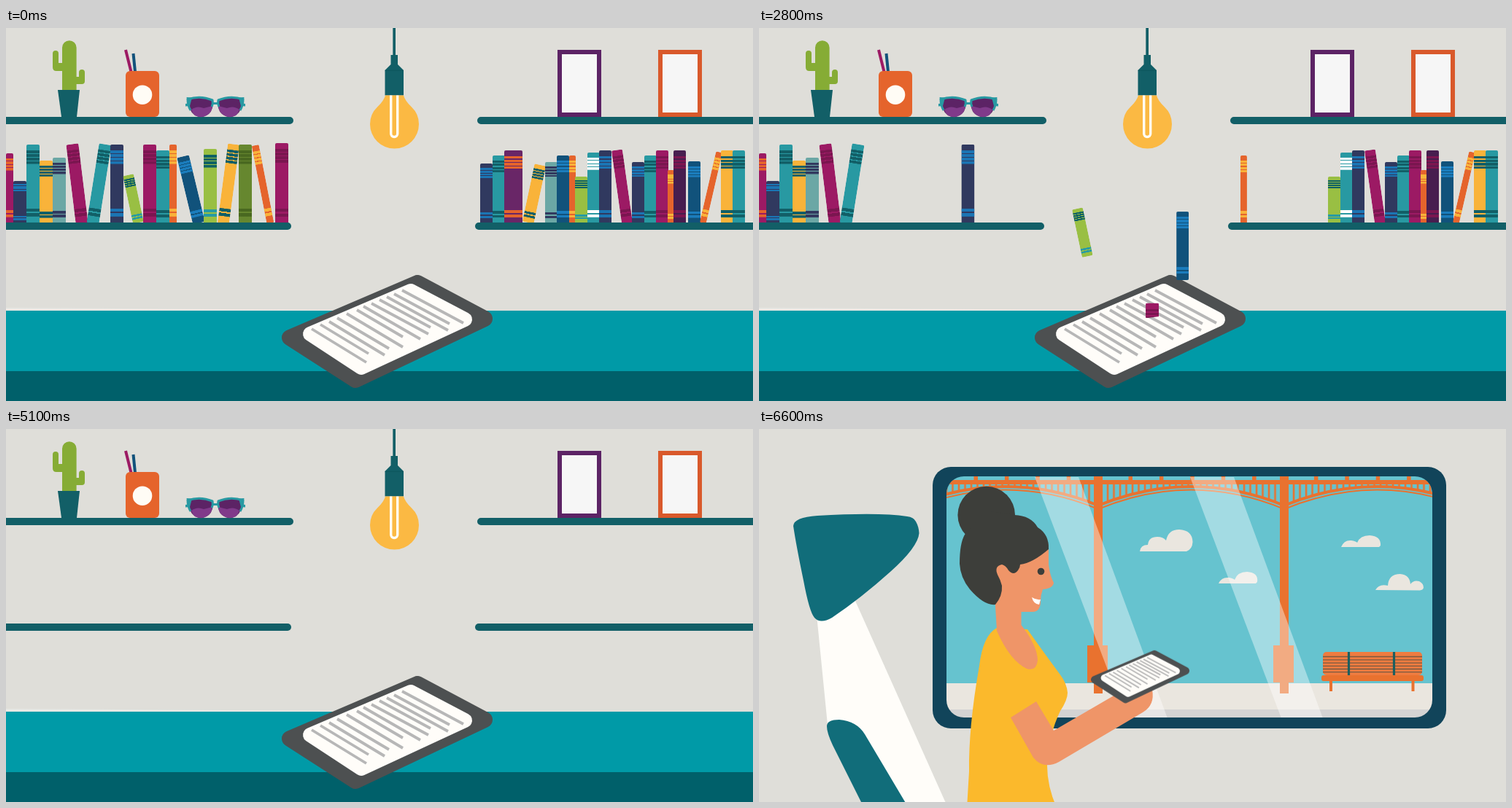
Recreate the animation shown at these times as an HTML page without scripts. Size 1024x512 px, loop 9100 ms.

```html
<!DOCTYPE html>
<html lang="en">
<head>
<meta charset="utf-8">
<title>Books into a tablet</title>
<style>
@property --t { syntax: '<number>'; inherits: true; initial-value: 0; }

html, body { margin: 0; width: 100%; height: 100%; overflow: hidden; background: #dfded9; }
.stage { position: absolute; inset: 0; overflow: hidden; contain: strict; }
svg, .books { position: absolute; left: 0; top: 0; width: 1024px; height: 512px; overflow: hidden; }

/* --t counts tenths of a second through the loop */
:root { animation: clock 9.1s steps(91) -5ms infinite; }
@keyframes clock { to { --t: 91; } }

.room, .tablet, .rider { animation: 9.1s step-end -5ms infinite; }
.room { animation-name: lift; }
.tablet { animation-name: shrink; transform-origin: 522.5px 416.5px; }
.rider { animation-name: settle; }
@keyframes lift {
  0% { transform: none; }
  61.54% { transform: translateY(-76px); }
  63.74% { transform: translateY(-156px); }
  65.93% { transform: translateY(-239px); }
  68.13% { transform: translateY(-332px); }
  70.33% { transform: translateY(-424px); }
  72.53%, 100% { transform: translateY(-520px); }
}
@keyframes shrink {
  0% { transform: none; }
  61.54% { transform: translate(-2px, -41px) scale(.93); }
  63.74% { transform: translate(-4px, -81.5px) scale(.848); }
  65.93% { transform: translate(-2px, -79px) scale(.66); }
  68.13%, 100% { transform: translate(0, -76.5px) scale(.467); }
}
@keyframes settle {
  0% { transform: translate(1px, 2px); }
  72.53%, 100% { transform: none; }
}

/* the lower shelf hides the feet of the books */
.shelf { position: absolute; top: 267px; height: 10px; background: #125f67; }
.shelf.west { left: 0; width: 391px; border-radius: 0 5px 5px 0; }
.shelf.east { left: 643px; width: 381px; border-radius: 5px 0 0 5px; }

/* each book slides to the shelf edge --e, then drops into the screen */
.books {
  clip-path: polygon(0 0, 1024px 0, 1024px 388px, 575px 388px, 565px 391px, 548px 396px,
    533px 398px, 512px 396px, 494px 394px, 0 380px);
}
.left { --e: 385; --dir: 1; --w: 18; --k: 2.15; --v: 74; }
.right { --e: 652; --dir: -1; --w: 17; --k: 2; --v: 64; }
.books i {
  --n: max(0, var(--t) - var(--s));
  --u: clamp(0, var(--t) - var(--s) - var(--k), 4);
  --h: calc(268.5px - var(--y) * 1px);
  --p: calc(var(--h) / 21);
  position: absolute;
  left: calc(var(--x) * 1px);
  top: calc(var(--y) * 1px);
  width: calc(var(--w) * 1px);
  height: var(--h);
  border-radius: 2px;
  background:
    repeating-linear-gradient(var(--b) 0 calc(var(--p) * .72), transparent 0 calc(var(--p) * .96))
      0 calc(var(--p) * 1.6) / 100% calc(var(--p) * 3.6) no-repeat,
    repeating-linear-gradient(var(--l, var(--b)) 0 calc(var(--p) * .85), transparent 0 calc(var(--p) * 1.25))
      0 calc(100% - var(--p) * 1.85) / 100% calc(var(--p) * 2.1) no-repeat,
    var(--c);
  transform:
    translate(
      calc(1px * ((var(--e) - var(--x) - var(--w) / 2) * min(var(--n) / var(--k), 1)
        + var(--dir) * var(--u) * (var(--v) - 7 * var(--u)))),
      calc(1px * var(--u) * (45 + 11 * var(--u))))
    rotate(var(--r, 0deg));
}
.magenta { --c: #9c1a64; --b: #7b1650; }
.wine { --c: #9c1a64; --b: #e5642c; }
.navy { --c: #30395f; --b: #1b75b4; }
.teal { --c: #2899a2; --b: #125f67; }
.aqua { --c: #2899a2; --b: #fff; }
.yellow { --c: #f9b33a; --b: #125f67; }
.sage { --c: #6ba7a5; --b: #32395f; }
.green { --c: #99bf43; --b: #0f6164; --l: #289ba3; }
.olive { --c: #66872f; --b: #496820; }
.blue { --c: #11527b; --b: #1b7dbd; }
.orange { --c: #e5642c; --b: #f9b33a; }
.purple { --c: #692667; --b: #e5642c; }
.plum { --c: #471e4f; --b: #7b1650; }
</style>
</head>
<body>
<div class="stage">
<svg viewBox="0 0 1024 512">
  <defs>
    <clipPath id="pane"><rect x="257" y="65" width="666" height="331" rx="24"/></clipPath>
    <pattern id="bars" width="8.5" height="40" patternUnits="userSpaceOnUse">
      <path d="M2 0V40" stroke="#e9722f" stroke-width="2.6"/>
    </pattern>
    <g id="span">
      <path d="M465 75H720V106Q592.5 53 465 106Z" fill="url(#bars)"/>
      <g fill="none" stroke="#e9722f">
        <path d="M465 105Q592.5 53 720 105" stroke-width="4"/>
        <path d="M465 110Q592.5 57 720 110" stroke-width="2"/>
      </g>
    </g>
    <g id="pillar" fill="#e9722f"><path d="M459 65h12V363h-12z"/><path d="M450 297h28v51h-28z"/></g>
    <path id="glare" d="M378 66H438L560 397H503Z" fill="#fff" opacity=".4"/>
    <path id="rim" d="M249 97Q266 92 283 99Q285 112 278 118Q269 125 259 120Q250 114 249 97Z"/>
  </defs>

  <!-- train -->
  <rect width="1024" height="512" fill="#dfded9"/>
  <rect x="238" y="52" width="704" height="359" rx="25" fill="#11445a"/>
  <g clip-path="url(#pane)">
    <path d="M257 65H923V349H257z" fill="#66c3cf"/>
    <path d="M257 349H923V385H257z" fill="#eae6df"/>
    <path d="M257 385H923V396H257z" fill="#d3d3d3"/>
    <g fill="#eae6df">
      <path d="M522 168Q523 159 533 159Q534 148 546 148Q554 148 558 153Q561 138 576 138Q594 139 594.500 155Q594 165 586 168Z"/>
      <path d="M630 212Q634 203 644 204Q650 205 652 207Q656 196 669 196Q685 197 683 210L681 212Z"/>
      <path d="M798 162Q802 152 812 153Q818 154 820 156Q824 146 837 146Q853 147 852 160L850 162Z"/>
      <path d="M845 221Q850 212 862 215Q863 199 879 199Q892 200 893 213Q897 207 905 209Q911 212 911 218Q910 221 906 221.500Z"/>
    </g>
    <use href="#span" x="-255"/><use href="#span"/><use href="#span" x="255"/>
    <path d="M257 73H923" stroke="#e9722f" stroke-width="6"/>
    <path d="M294.500 67.500H923" stroke="#e9722f" stroke-width="5" stroke-dasharray="5.500 36.900"/>
    <use href="#pillar"/><use href="#pillar" x="255"/>
    <rect x="773" y="306" width="136" height="32" rx="5" fill="#ee7c40"/>
    <path d="M773 312.500h136m-136 4.300h136m-136 4.300h136m-136 4.200h136m-136 4.200h136m-136 4.200h136" stroke="#7a5a41" stroke-width="1.300"/>
    <path d="M808.500 306v32M870.500 306v32" stroke="#1d5f60" stroke-width="3.200"/>
    <path d="M784 345v15M896.500 345v15" stroke="#e9722f" stroke-width="4"/>
    <rect x="771" y="338" width="140" height="8" rx="3" fill="#e9722f"/>
    <use href="#glare"/><use href="#glare" x="213"/>
  </g>
  <g class="rider">
    <path d="M79 255L132 236L259 520H160L94 406Z" fill="#fffdf9"/>
    <g fill="#116d7a">
      <path d="M47 133Q48 121 80 119Q165 114 203 120Q212 121 215 127Q219 134 219.500 143Q218 162 180 196Q140 232 100 259Q84 268 76 259Q69 251 61 208Q51 160 47 133Z"/>
      <path d="M93 408Q93 399 110 399Q134 401 145 419L205 520H144L101 434Q93 417 93 408Z"/>
    </g>
    <path d="M326 273Q307 283 302 325Q287 410 288 470L285 520H408Q395 490 395 462Q397 420 413 387Q423 372 423 362Q422 349 412 336Q384 298 368 275Z" fill="#fbb92c"/>
    <g fill="#ef9568">
      <path d="M322 180L397 158V186Q399 202 404 211Q403 219 389 220Q386 228 386 236Q386 251 375 251H359.500V269Q382 298 382 318Q380 333 367 329Q344 318 326 277L323.500 235Z"/>
      <path d="M345 396L380 374L404 414L488 365L539 358Q543 379 526 389L411 457Q390 468 376 451Z"/>
    </g>
    <path d="M374 231Q380 235 386 234L384 241Q376 240 374 231Z" fill="#fff"/>
    <g fill="#3d3e3a">
      <circle cx="386.500" cy="195.500" r="4.800"/>
      <circle cx="311.700" cy="118" r="39.300"/>
      <path d="M282 145Q275 157 275 185Q276 204 289 220Q309 243 324 241Q334 229 333 215Q331 207 327 200Q322 188 333 186Q338 187 342 194Q349 202 355 194Q358 190 358 186Q375 184 397 165Q398 145 382 135Q373 119 350 118L311 112Z"/>
    </g>
  </g>

  <!-- room -->
  <g class="room">
    <rect width="1024" height="390" fill="#dfded9"/>
    <path d="M0 384L446 387V388H0Z" fill="#e9e8e4"/>
    <rect y="388" width="1024" height="83" fill="#009aa7"/>
    <rect y="471" width="1024" height="43" fill="#00606a"/>
    <path d="M-9 127H389M651 127H1034" stroke="#125f67" stroke-width="10" stroke-linecap="round"/>

    <g fill="#125f67">
      <path d="M530.300 0h3.700V37h3V50L545 58V92.500H519.500V58L527.500 50V37h2.800Z"/>
      <path d="M71 85H101L97 122H76Z"/>
    </g>
    <path d="M519.500 58.300h25" stroke="#0c525a" stroke-width=".7"/>
    <path d="M520 92.500H545Q547 100 556 108.500Q566 118 566 132A33.500 33.500 0 0 1 499 132Q499 118 509 108.500Q518 100 520 92.500Z" fill="#fbb943"/>
    <path d="M527.700 92.500V145a4.500 4.500 0 0 0 9 0V92.500" fill="none" stroke="#fffdf5" stroke-width="3.400"/>

    <rect x="759" y="33" width="54" height="86" fill="#f6f6f6" stroke="#5c2365" stroke-width="6"/>
    <rect x="897" y="33" width="54" height="86" fill="#f6f6f6" stroke="#d9592b" stroke-width="6"/>

    <path d="M77 85V27a9.800 9.800 0 0 1 19.600 0V67H100V61a4 4 0 0 1 8 0V73Q108 77 104 77H96.600V85ZM77 59H69Q64 59 64 54V35a4 4 0 0 1 8 0V48H77Z" fill="#86ac35"/>

    <path d="M164 30L171.500 60" stroke="#9c1a64" stroke-width="4"/>
    <path d="M174.500 35L177 60" stroke="#11527b" stroke-width="4"/>
    <rect x="164" y="59" width="46" height="63" rx="6" fill="#e5642c"/>
    <circle cx="187" cy="91.700" r="13.300" fill="#fffcf5"/>

    <g id="lens">
      <use href="#rim" fill="#5c2365"/>
      <path d="M254 112Q262 106 271 110L283 107Q282 115 277 118.500Q269 125 259 120Q256 117 254 112Z" fill="#803a8a"/>
      <path d="M253 113Q249 106 249 98Q266 92 283 99Q284 104 282 108" fill="none" stroke="#2899a2" stroke-width="3"/>
      <path d="M247.500 95L255 95.500L252 107L246 107.500V104L249 103.500Z" fill="#2899a2"/>
    </g>
    <use href="#lens" transform="matrix(-1 0 0 1 574 0)"/>
    <path d="M282 103.500H292" stroke="#2899a2" stroke-width="3"/>
  </g>

  <g class="tablet" stroke-linejoin="round">
    <path d="M389 425L564 350L656 399L479 483Z" fill="#4d5051" stroke="#4d5051" stroke-width="22"/>
    <path d="M417 420L555 361L629 400L487 466Z" fill="#fffdf9" stroke="#fffdf9" stroke-width="20"/>
    <path d="M419 413L494 459M431 407L497 447M443 403L519 449M454 398L525 440M467 392L544 438M481 387L544 424M490 382L568 427M501 378L579 420M512 373L582 411M522 369L606 415M532 365L608 406M543 360L627 405" stroke="#b7b7b7" stroke-width="3.800"/>
  </g>
</svg>

<div class="books">
  <div class="left">
    <i class="wine" style="--x:0;--w:10;--y:172;--s:34.2;--k:4.25;--v:29"></i>
    <i class="navy" style="--x:10;--y:210;--s:33;--k:4.4;--v:91"></i>
    <i class="teal" style="--x:28;--y:160;--s:31.7;--k:4.77;--v:82"></i>
    <i class="yellow" style="--x:46;--y:182;--s:31.01;--k:2.6"></i>
    <i class="sage" style="--x:64;--y:178;--s:30.07;--k:2.6;--v:57"></i>
    <i class="magenta" style="--x:88.5;--w:17;--y:158.7;--r:-7deg;--s:29.03;--k:2.6;--v:72.5"></i>
    <i class="teal" style="--x:119;--w:17;--y:158.7;--r:9deg;--s:28.14;--k:2.6;--v:77"></i>
    <i class="navy" style="--x:143;--y:160;--s:26.5;--k:2.6"></i>
    <i class="green" style="--x:166.5;--w:15;--y:201.3;--r:-12deg;--s:25"></i>
    <i class="magenta" style="--x:188;--y:160;--s:23"></i>
    <i class="teal" style="--x:206;--y:168;--s:22.09"></i>
    <i class="orange" style="--x:224;--w:10;--y:160;--s:21.02"></i>
    <i class="blue" style="--x:244.5;--w:17;--y:174.7;--r:-13.5deg;--s:20.02;--v:77"></i>
    <i class="green" style="--x:271;--y:166;--s:18.9"></i>
    <i class="yellow" style="--x:296.5;--w:16;--y:159;--r:7.5deg;--s:17.92;--v:69"></i>
    <i class="olive" style="--x:319;--y:160;--s:16.5"></i>
    <i class="orange" style="--x:347;--w:10;--y:160;--r:-11deg;--s:15.2"></i>
    <i class="magenta" style="--x:369;--y:158;--s:14"></i>
  </div>
  <div class="right">
    <i class="navy" style="--x:650;--y:186;--s:20;--k:.42;--v:55"></i>
    <i class="teal" style="--x:667;--y:175;--s:20;--k:.7"></i>
    <i class="purple" style="--x:683;--w:25;--y:168;--s:21;--k:.77"></i>
    <i class="yellow" style="--x:716;--w:16;--y:187.2;--r:12deg;--s:22;--k:1.27"></i>
    <i class="sage" style="--x:739;--y:184;--s:23;--k:1.5"></i>
    <i class="blue" style="--x:755;--y:175;--s:24.7"></i>
    <i class="orange" style="--x:772;--w:9;--y:175;--s:26.2"></i>
    <i class="green" style="--x:780;--y:204;--s:28.51;--v:62"></i>
    <i class="aqua" style="--x:797;--y:171;--s:29.62;--v:62"></i>
    <i class="navy" style="--x:813;--y:168;--s:30.99"></i>
    <i class="magenta" style="--x:837;--w:15;--y:167;--r:-8deg;--s:32.22"></i>
    <i class="navy" style="--x:858;--y:184;--s:33"></i>
    <i class="teal" style="--x:875;--y:175;--s:34.03;--k:2.7;--v:53"></i>
    <i class="magenta" style="--x:891;--y:168;--s:35.5;--k:2.7;--v:47"></i>
    <i class="orange" style="--x:907;--w:9;--y:195;--s:37.55;--k:2.7"></i>
    <i class="plum" style="--x:915;--y:168;--s:38.6;--k:2.7"></i>
    <i class="blue" style="--x:935;--y:183;--s:39;--k:3"></i>
    <i class="orange" style="--x:961.5;--w:9;--y:168.5;--r:13deg;--s:40.4;--k:3"></i>
    <i class="yellow" style="--x:980;--y:168;--s:41.8;--k:3.4"></i>
    <i class="teal" style="--x:996;--y:168;--s:43.28;--k:4"></i>
  </div>
</div>
<div class="room shelf west"></div>
<div class="room shelf east"></div>
</div>
</body>
</html>
```
